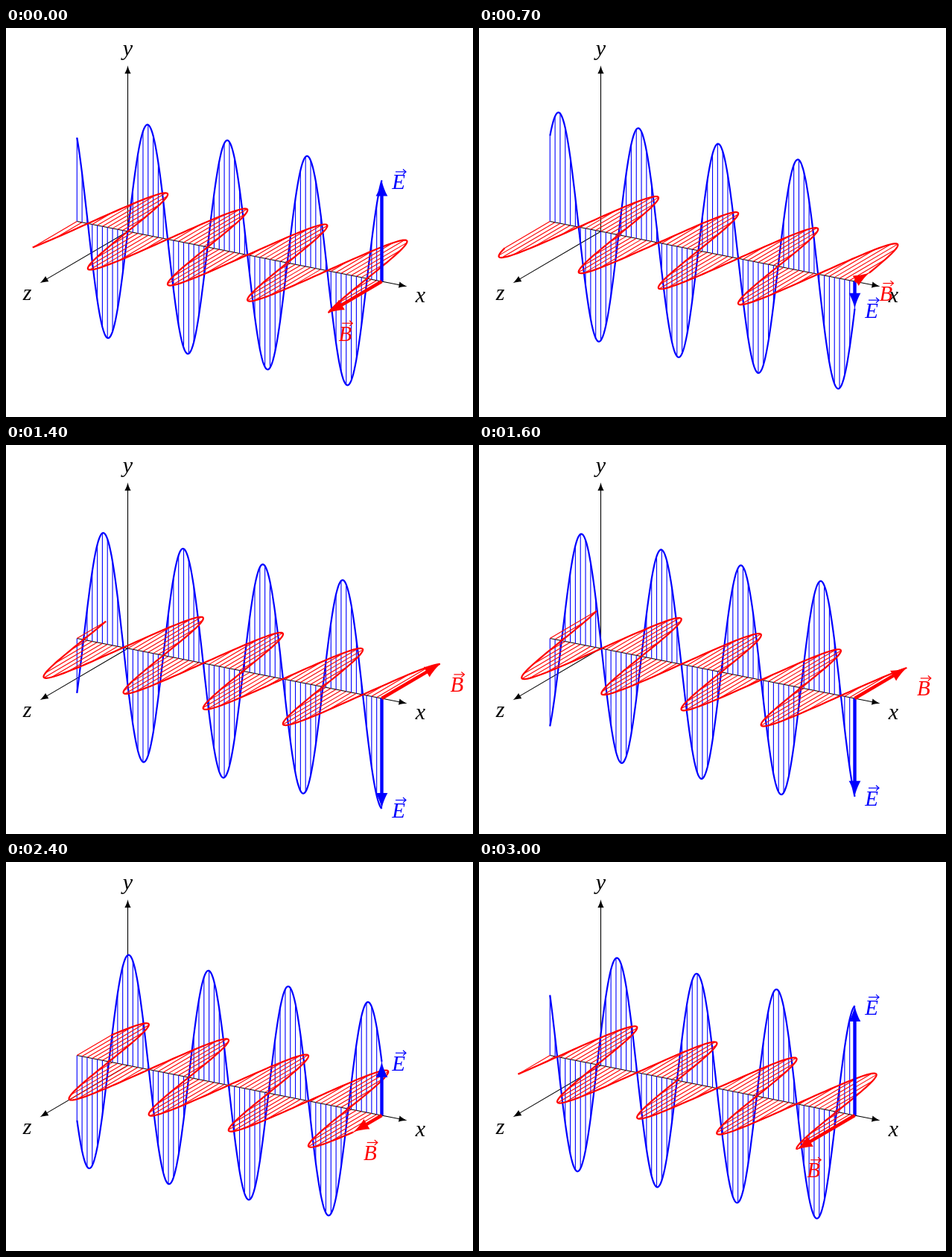
Write an HTML page with a canvas that moves like this. It is 627 px wide and 522 px high and loops after 3.1 s.

```html
<!DOCTYPE html>
<html lang="en">
<head>
<meta charset="utf-8">
<title>Electromagnetic wave</title>
<style>
  html, body { margin: 0; width: 100%; height: 100%; overflow: hidden; background: #fff; }
  canvas { display: block; }
</style>
</head>
<body>
<canvas id="stage" width="627" height="522"></canvas>
<script>
const ctx = document.getElementById('stage').getContext('2d');
const BLUE = '#00f', RED = '#f00', BLACK = '#000';
const THIN = 1.107, THICK = 2.21, HEAVY = 4.43;
const STEP_MS = 100, STEPS = 31;
const X_MIN = -1, X_MAX = 5;

// Oblique projection: each axis unit is a screen vector.
const project = (x, y, z) => [163.5 + 68.2 * x - 78.6 * z, 272.9 + 13.42 * x - 148.5 * y + 46.2 * z];
const electric = (x, v) => project(x, v, 0);
const magnetic = (x, v) => project(x, 0, v);

function polyline(points, color, width) {
  ctx.strokeStyle = color;
  ctx.lineWidth = width;
  ctx.beginPath();
  points.forEach(p => ctx.lineTo(...p));
  ctx.stroke();
}

// Straight arrow with a slightly concave head scaled by line width.
function arrow(from, to, color, width) {
  const unit = 0.775 + 0.3 * width;
  const length = Math.hypot(to[0] - from[0], to[1] - from[1]);
  ctx.save();
  ctx.translate(...to);
  ctx.rotate(Math.atan2(to[1] - from[1], to[0] - from[0]));
  polyline([[-length, 0], [-9.5 * unit, 0]], color, width);
  ctx.scale(unit, unit);
  ctx.fillStyle = color;
  ctx.beginPath();
  ctx.moveTo(0, 0);
  ctx.bezierCurveTo(-2.67, 0.5, -7, 2, -10, 3.75);
  ctx.lineTo(-10, -3.75);
  ctx.bezierCurveTo(-7, -2, -2.67, -0.5, 0, 0);
  ctx.fill();
  ctx.restore();
}

function label(text, x, y, color = BLACK, size = 30) {
  ctx.font = `italic ${size}px "Liberation Serif", serif`;
  ctx.textAlign = 'center';
  ctx.fillStyle = color;
  ctx.fillText(text, x, y);
}

function vectorLabel(text, x, y, color) {
  label(text, x, y, color, 29);
  const tip = x + 10, top = y - 23.5;
  polyline([[tip - 14, top], [tip, top]], color, 1.2);
  polyline([[tip - 4, top - 3.5], [tip, top], [tip - 4, top + 3.5]], color, 1.2);
}

function drawAxes() {
  const origin = project(0, 0, 0);
  arrow(project(X_MIN, 0, 0), project(5.5, 0, 0), BLACK, THIN);
  arrow(origin, project(0, 1.5, 0), BLACK, THIN);
  arrow(origin, project(0, 0, 1.5), BLACK, THIN);
  label('x', 556.5, 368);
  label('y', 163.5, 37);
  label('z', 28.5, 365);
}

function drawWave(place, wave, color) {
  for (let i = X_MIN * 10; i <= X_MAX * 10; i++) {
    const x = i / 10;
    polyline([place(x, 0), place(x, wave(x))], color, THIN);
  }
  const curve = [];
  for (let i = X_MIN * 50; i <= X_MAX * 50; i++) curve.push(place(i / 50, wave(i / 50)));
  polyline(curve, color, THICK);
}

function drawVector(place, value, color, text, dx, dy) {
  const tip = place(X_MAX, value);
  arrow(place(X_MAX, 0), tip, color, HEAVY);
  vectorLabel(text, tip[0] + dx, tip[1] + dy, color);
}

function draw(now) {
  const phase = 0.2 * (Math.floor(now / STEP_MS) % STEPS);
  const wave = x => Math.sin(4 * x - phase);
  ctx.fillStyle = '#fff';
  ctx.fillRect(0, 0, 627, 522);
  drawAxes();
  drawWave(electric, wave, BLUE);
  drawWave(magnetic, wave, RED);
  drawVector(electric, wave(X_MAX), BLUE, 'E', 22.5, 12);
  drawVector(magnetic, wave(X_MAX), RED, 'B', 22.5, 37.5);
}

const start = performance.now();
(function tick() {
  draw(performance.now() - start);
  requestAnimationFrame(tick);
})();
</script>
</body>
</html>
```
